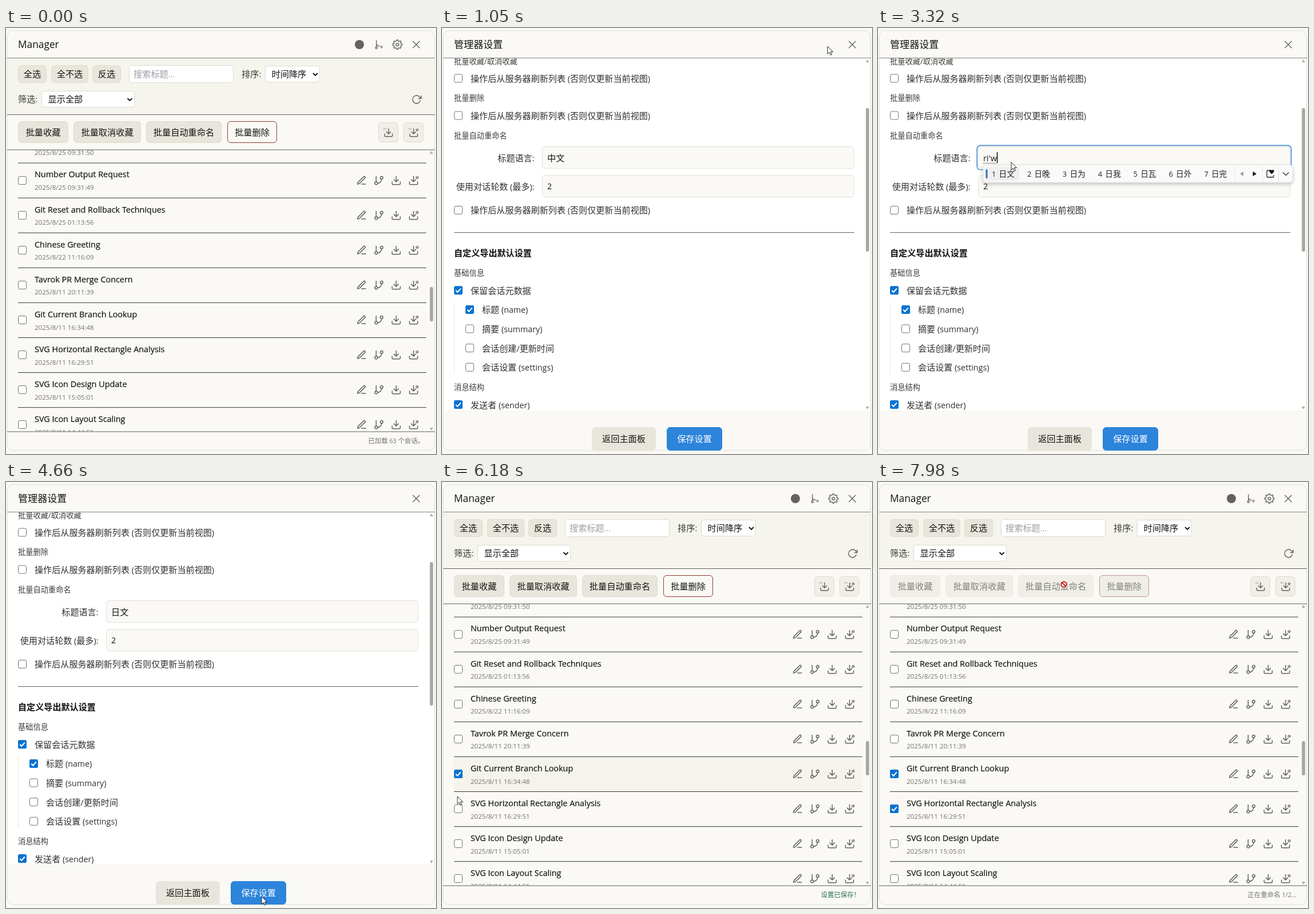
Write an HTML page that moves like this. It is 752 by 745 pixels and loops after 8000 ms.

```html
<!DOCTYPE html>
<html lang="zh-CN">
<head>
<meta charset="utf-8">
<title>Manager</title>
<style>
html, body { margin: 0; width: 100%; height: 100%; overflow: hidden; background: #faf9f5; }
svg { display: block; }
text { font-family: 'Open Sans', 'Noto Sans CJK SC', 'Noto Sans CJK', sans-serif; white-space: pre; }
.ic { fill: none; stroke: #63625d; stroke-width: 1.9; stroke-linecap: round; stroke-linejoin: round; }
</style>
</head>
<body>
<svg id="stage" width="752" height="745" viewBox="0 0 752 745"></svg>
<script>
const LOOP = 8000, STEP = 66.5;
const INK = '#141413', MUTED = '#73726c', BUTTON = '#e8e6dc', EDGE = '#dedbcf', BLUE = '#2c84db', RULE = '#5f5e5a';
const $ = id => document.getElementById(id);

// Latin runs are set slightly smaller than the ideographs around them
const runs = (str, size) => str.replace(/[\x20-\x7e]+/g,
  m => `<tspan font-size="${(size * 0.945).toFixed(2)}">${m}</tspan>`);
const text = (x, mid, size, str, fill = INK, more = '') =>
  `<text x="${x}" y="${(mid + size * 0.36).toFixed(2)}" font-size="${size}" fill="${fill}" ${more}>${runs(str, size)}</text>`;
const rect = (x, y, w, h, fill, r = 0, stroke = 'none', more = '') =>
  `<rect x="${x}" y="${y}" width="${w}" height="${h}" rx="${r}" fill="${fill}" stroke="${stroke}" ${more}/>`;
const box = (x, y, w, h, fill, r, stroke) => rect(x + 0.5, y + 0.5, w - 1, h - 1, fill, r, stroke);
const path = (d, stroke, w, more = '') =>
  `<path d="${d}" fill="none" stroke="${stroke}" stroke-width="${w}" ${more}/>`;
const hline = (x, y, w, fill) => rect(x, y, w, 1, fill);
const button = (x, y, w, h, label, fill = BUTTON, edge = EDGE, ink = INK) =>
  box(x, y, w, h, fill, 5.5, edge) + text(x + w / 2, y + h / 2 + 0.3, 15.2, label, ink, 'text-anchor="middle"');
const tick = (x, mid) => rect(x, mid - 7.5, 15, 15, '#0a73d0', 2.5) +
  path(`M${x + 3.2} ${mid + 0.3}l3 3l5.6 -6.4`, '#fff', 2);
const check = (x, mid, on) => on ? tick(x, mid) : box(x, mid - 7.5, 15, 15, '#fff', 2.5, '#767676');
const icon = (cx, cy, size, body) =>
  `<g class="ic" transform="translate(${cx - size / 2} ${cy - size / 2}) scale(${size / 24})">${body}</g>`;
const scroller = (top, bottom, y, h) =>
  `<path d="M741 ${top + 2}h6l-3 -5zM741 ${bottom - 2}h6l-3 5z" fill="#b0afab"/>` + rect(741.3, y, 5.6, h, '#a6a5a1', 2.8);
const chevron = (x, y) => path(`M${x - 4} ${y - 2}l4 4l4 -4`, '#111', 1.8);

const TRAY = '<path d="M21 15v4a2 2 0 0 1-2 2H5a2 2 0 0 1-2-2v-4M7 10l5 5l5-5M12 15V3"/>';
const cog = (x, y) => `<circle cx="${x}" cy="${y}" r="1.7" stroke-width="1.3"/>` +
  `<circle cx="${x}" cy="${y}" r="3" stroke-width="1.3" stroke-dasharray="1.1 1.256" stroke-linecap="butt"/>`;
const ICONS = {
  pencil: '<path d="M12 20h9M16.5 3.5a2.12 2.12 0 0 1 3 3L7 19l-4 1l1-4z"/>',
  branch: '<path d="M6 3v12M18 9a9 9 0 0 1-9 9"/><circle cx="18" cy="6" r="3"/><circle cx="6" cy="18" r="3"/>',
  save: TRAY,
  custom: TRAY + cog(20, 5.5),
  tree: '<path d="M6 2v15M6 9c0 4 3 6 7.5 6.5"/><circle cx="6" cy="20" r="2.4"/>' + cog(18.5, 18),
  close: '<path d="M4 4l16 16M20 4L4 20"/>',
  reload: '<path d="M22.5 4v6h-6M20.5 15a9 9 0 1 1-2.1-9.4L22.5 10"/>'
};

function gear() {
  let d = '';
  for (let i = 0; i < 32; i++) {
    const a = (i - 0.5) / 32 * Math.PI * 2, r = i % 4 < 2 ? 11 : 8.6;
    d += (i ? 'L' : 'M') + (12 + r * Math.cos(a)).toFixed(2) + ' ' + (12 + r * Math.sin(a)).toFixed(2);
  }
  return `<path d="${d}z"/><circle cx="12" cy="12" r="3.2"/>`;
}

const ROWS = [
  ['Number Output Request', '25 09:31:49'],
  ['Git Reset and Rollback Techniques', '25 01:13:56'],
  ['Chinese Greeting', '22 11:16:09'],
  ['Tavrok PR Merge Concern', '11 20:11:39'],
  ['Git Current Branch Lookup', '11 16:34:48'],
  ['SVG Horizontal Rectangle Analysis', '11 16:29:51'],
  ['SVG Icon Design Update', '11 15:05:01'],
  ['SVG Icon Layout Scaling', '11 14:44:51']
];
const rowTop = i => 235.6 + 61.08 * i;
const date = (mid, s) => text(50, mid, 12.25, '2025/8/' + s, MUTED);

function row([title, when], i) {
  const y = rowTop(i), mid = Math.round(y + 30) + 0.5;
  return hline(21, y, 714, '#3a3a37') + check(21, mid, false) +
    (i === 4 || i === 5 ? `<g id="tick${i}">${tick(21, mid)}</g>` : '') +
    text(50, y + 20.4, 15.24, title, INK, `stroke="${INK}" stroke-width=".2"`) + date(y + 43.2, when) +
    ['pencil', 'branch', 'save', 'custom'].map((k, n) => icon(621.8 + 30.3 * n, mid + 0.2, 19, ICONS[k])).join('');
}

function exportButton(x, k) {
  return box(x, 165, 35, 35, '#f0eee6', 5.5, EDGE) + icon(x + 18, 183, 18, ICONS[k]) +
    text(x + 8.5, 177, 3.9, 'TXT', MUTED);
}

const mainView = () =>
  text(21, 28, 18.3, 'Manager') +
  '<circle cx="618" cy="29" r="8" fill="#63625d"/>' +
  icon(652, 29, 17, ICONS.tree) + icon(684.5, 29, 18, gear()) + icon(717.5, 29, 17, ICONS.close) +
  rect(2.5, 53, 747, 98, '#f5f4ed') + hline(2, 52, 748, '#85847f') +
  button(21, 65, 50, 31, '全选') + button(79, 65, 65, 31, '全不选') + button(151, 65, 50, 31, '反选') +
  box(215, 65, 183, 31, '#fff', 4.5, EDGE) + text(223, 80.5, 15.2, '搜索标题...', '#9a9fa4') +
  text(412, 80.5, 15.2, '排序:', '#3d3d3a') + box(453, 66, 96, 29, '#fff', 4, EDGE) +
  text(464.5, 80.5, 15.2, '时间降序') + chevron(541, 81) +
  text(21, 125, 15.2, '筛选:', '#3d3d3a') + box(62, 110, 163, 29, '#fff', 4, EDGE) +
  text(73.5, 125, 15.2, '显示全部') + chevron(216.5, 125) +
  icon(718, 125, 18.5, ICONS.reload) + hline(2, 151, 748, RULE) +
  '<g id="batch">' + button(21, 163, 88, 38, '批量收藏') + button(118, 163, 118, 38, '批量取消收藏') +
  button(245, 163, 132, 38, '批量自动重命名') + rect(387.5, 163.5, 86, 37, BUTTON, 5.5, 'none', 'id="dim"') +
  button(387, 163, 87, 38, '批量删除', 'none', '#8f3b37') + '</g>' +
  exportButton(651, 'save') + exportButton(695, 'custom') + hline(2, 212.5, 748, RULE) +
  '<g clip-path="url(#list)">' + rect(21, 0, 714, 60.1, '#f5f4ec', 0, 'none', 'id="hover"') +
  date(218, '25 09:31:50') + ROWS.map(row).join('') + '</g>' +
  scroller(218, 701, 453, 60) + hline(2, 705.5, 748, RULE) +
  '<text id="status" x="731.5" y="726.2" font-size="11.47" text-anchor="end"></text>';

const label = (mid, s) => text(21, mid, 13.25, s, '#3d3d3a');
const option = (x, mid, s, on) => check(x, mid, on) + text(x + 29, mid + 0.5, 15.1, s, '#30302d');
const REFRESH = '操作后从服务器刷新列表 (否则仅更新当前视图)';

const settingsView = () =>
  rect(3, 53, 746, 616, '#fff') + hline(2, 52, 748, '#85847f') +
  text(21, 28.5, 17.1, '管理器设置') + icon(717.5, 29, 17, ICONS.close) +
  '<g clip-path="url(#form)">' +
  label(58, '批量收藏/取消收藏') + option(21, 88, REFRESH) +
  label(122, '批量删除') + option(21, 153, REFRESH) + label(188, '批量自动重命名') +
  text(161.5, 227.5, 15.1, '标题语言:', '#30302d', 'text-anchor="end"') +
  rect(173.2, 205.4, 549.4, 42.6, '#fff', 6, '#4a8fd6', 'id="ring" stroke-width="1.7"') +
  box(175, 207, 546, 39, '#faf9f5', 4.5, '#e2e0d6') +
  rect(184, 218, 30.4, 18, '#0a73d0', 0, 'none', 'id="mark"') +
  '<text id="lang" x="184" y="232.7" font-size="15.2"></text>' +
  '<path id="under" fill="none" stroke="#222" stroke-dasharray="1 1"/>' +
  rect(0, 217, 1.4, 19, '#000', 0, 'none', 'id="caret"') +
  text(161.5, 277.5, 15.1, '使用对话轮数 (最多):', '#30302d', 'text-anchor="end"') +
  box(175, 257, 546, 39, '#faf9f5', 4.5, '#e2e0d6') + text(184, 277, 15.2, '2') +
  option(21, 318.5, REFRESH) + rect(21, 357, 700, 1.2, '#74736f') +
  text(21, 394, 15.1, '自定义导出默认设置', '#111', 'font-weight="700"') + label(428, '基础信息') +
  option(21, 458.7, '保留会话元数据', true) + rect(21, 480, 1, 125, '#e8e6dc') +
  option(41, 492.4, '标题 (name)', true) + option(41, 526, '摘要 (summary)') +
  option(41, 559.6, '会话创建/更新时间') + option(41, 593.3, '会话设置 (settings)') +
  label(628.5, '消息结构') + option(21, 658.6, '发送者 (sender)', true) + '</g>' +
  scroller(58, 664, 140, 251) +
  button(262, 698, 112, 41, '返回主面板', BUTTON, BUTTON) +
  button(393, 698, 97, 41, '保存设置', BLUE, BLUE, '#fff') + `<g id="ime">${popup()}</g>`;

function popup() {
  return rect(184, 239.5, 541.5, 30.5, '#fafafa', 6, '#e2e2e2', 'filter="url(#soft)"') +
    rect(187, 243, 60, 24, '#efefef', 4) + rect(188.5, 247, 3, 16, '#3670b8', 1.5) + '<g id="words"></g>' +
    [624, 672, 700].map(x => rect(x, 240, 1, 29.5, '#e6e6e6')).join('') +
    '<path d="M639 251v8l-6 -4z" fill="#9b9b9b"/><path d="M655.5 251v8l6.5 -4z" fill="#111"/>' +
    path('M685 249h-3q-2 0 -2 2v8q0 2 2 2h8q2 0 2 -2v-2', '#222', 1.3) +
    '<path d="M688.5 255.5l-3.6 -3.6a2.2 2.2 0 0 1 3.6 -3a2.2 2.2 0 0 1 3.6 3z" fill="#111"/>' +
    path('M708 252.5l5.3 5l5.3 -5', '#333', 1.3);
}

$('stage').innerHTML = `<defs>
  <clipPath id="list"><rect x="2" y="213.5" width="748" height="492"/></clipPath>
  <clipPath id="form"><rect x="2" y="53" width="738" height="616"/></clipPath>
  <filter id="soft" x="-5%" y="-30%" width="110%" height="190%"><feDropShadow dx="0" dy="3" stdDeviation="3" flood-opacity=".22"/></filter>
</defs>` + rect(2, 4.5, 747.5, 734.5, '#faf9f5', 11, '#dfddd3') +
  `<g id="main">${mainView()}</g><g id="settings">${settingsView()}</g><g id="pointer">
  <path id="arrow" d="M0 0V13.3L3.2 10.4L5.3 15.2L7.4 14.3L5.3 9.7H9.5Z" fill="#fff" stroke="#111" stroke-width=".9"/>
  <path id="beam" d="M-3 -8H-1L0 -7L1 -8H3M0 -7V7M-3 8H-1L0 7L1 8H3" fill="none" stroke="#111"/>
  <g id="stop"><circle r="5" fill="#fff" stroke="#fff" stroke-width="3.4"/><circle r="4.8" fill="none" stroke="#b9141b" stroke-width="2"/><path d="M-3.4 -3.4L3.4 3.4" stroke="#b9141b" stroke-width="2"/></g></g>`;

// time, x, y of the pointer
const TRACK = [
  [130, 652, 487], [400, 655, 330], [650, 667, 120], [800, 680, 42], [920, 680, 25], [1056, 676, 31],
  [1190, 600, 80], [1320, 380, 180], [1450, 223, 251], [1585, 223, 251], [1650, 233, 237], [3000, 233, 234],
  [3920, 233, 236], [4100, 250, 300], [4300, 350, 540], [4500, 440, 700], [4600, 447, 725], [4740, 447, 725],
  [5000, 350, 640], [5248, 253, 535], [5400, 160, 485], [5580, 75, 464], [5640, 52, 485], [5760, 29, 508],
  [6050, 27, 511], [6250, 27, 571], [6500, 28, 571], [6800, 200, 350], [7044, 329, 119], [7180, 331, 120],
  [7250, 328, 133], [7400, 322, 160], [7580, 325, 179]
];
const TYPED = [[0, '中文'], [2320, ''], [3050, 'r'], [3180, 'ri'], [3320, "ri'w"], [3450, "ri'we"], [3520, "ri'wen"], [3660, '日文']];
const STATUS = [[0, '已加载 63 个会话。', MUTED], [4730, '设置已保存！', '#2a6f53'], [6730, '准备就绪。', MUTED], [7780, '正在重命名 1/2...', MUTED]];
const SINGLE = [...'人日让如热入然'], PAIRS = '日文 日晚 日为 日我 日瓦 日外 日完'.split(' ');

const at = (list, t) => list.filter(e => e[0] <= t).pop();
const show = (id, on) => $(id).setAttribute('display', on ? 'inline' : 'none');
const between = (t, a, b) => t >= a && t < b;

function pointerAt(t) {
  const i = TRACK.findIndex(k => k[0] > t);
  if (i < 0) return TRACK[TRACK.length - 1].slice(1);
  if (i === 0) return TRACK[0].slice(1);
  const [a, ax, ay] = TRACK[i - 1], [b, bx, by] = TRACK[i], u = (t - a) / (b - a);
  return [ax + (bx - ax) * u, ay + (by - ay) * u];
}

const last = {};
function fill(id, key, html) {
  if (last[id] === key) return;
  last[id] = key;
  $(id).innerHTML = html();
}

function drawForm(t) {
  const typed = at(TYPED, t)[1], ime = between(t, 3050, 3660), focus = between(t, 1790, 4600);
  const marked = between(t, 1990, 2320);
  fill('lang', typed, () => runs(typed, 15.2));
  $('lang').setAttribute('fill', marked ? '#fff' : INK);
  show('ring', focus);
  show('mark', marked);
  show('ime', ime);
  if (ime) {
    const words = t < 3320 ? SINGLE : PAIRS;
    fill('words', words[0], () => words.map((w, i) =>
      text(199 + 61.9 * i, 255, 13.6, String(i + 1), '#222') + text(211.6 + 61.9 * i, 255, 13.6, w, '#222')).join(''));
  }
  const end = 184 + (typed ? $('lang').getComputedTextLength() : 0);
  const start = t < 2320 ? 1790 : t < 3050 ? 2320 : 3660;
  show('caret', focus && !marked && (ime || Math.floor((t - start) / 530) % 2 === 0));
  $('caret').setAttribute('x', end);
  $('under').setAttribute('d', ime ? `M184 236.5H${end}` : 'M0 0');
}

function draw(t) {
  const q = Math.floor((t + 14) / STEP) * STEP - 5;
  const form = between(t, 1050, 4730);
  show('main', !form);
  show('settings', form);

  if (form) drawForm(t);
  else {
    const [, msg, color] = at(STATUS, t);
    fill('status', msg, () => runs(msg, 11.47));
    $('status').setAttribute('fill', color);
    show('tick4', t >= 5980);
    show('tick5', t >= 6440);
    const fade = Math.min(1, Math.max(0, (t - 7780) / 190));
    $('batch').setAttribute('opacity', 1 - 0.48 * fade);
    $('dim').setAttribute('opacity', fade);
    // the row highlight trails the pointer a little
    const y = pointerAt(q - 80)[1], i = Math.floor((y - rowTop(0)) / 61.08);
    show('hover', t >= 200 && i >= 0 && i < 8);
    $('hover').setAttribute('y', rowTop(i) + 1);
  }

  const [x, y] = pointerAt(q), stop = t >= 7780;
  const beam = between(t, 1640, 3050) || between(t, 3660, 4050);
  show('pointer', t >= 130 && !between(t, 2320, 3050) && !between(t, 3660, 3930));
  show('arrow', !beam && !stop);
  show('beam', beam);
  show('stop', stop);
  $('pointer').setAttribute('transform', `translate(${x.toFixed(1)} ${y.toFixed(1)})`);
}

const begin = performance.now();
function tickFrame() {
  draw((performance.now() - begin) % LOOP);
  requestAnimationFrame(tickFrame);
}
tickFrame();
</script>
</body>
</html>
```
